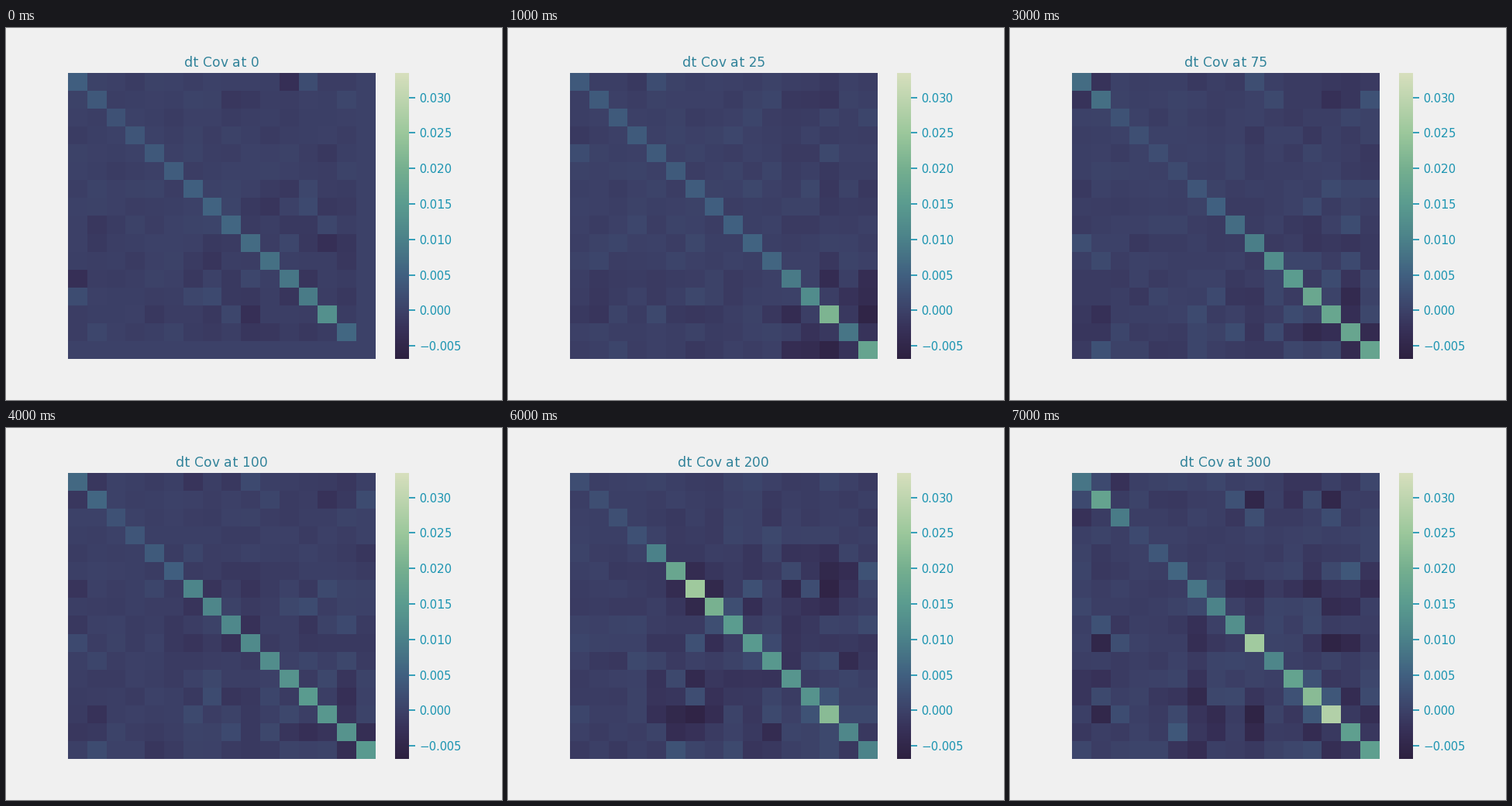
These frames come from a looping animation (640x480 px, 8000 ms). A matplotlib script:

```python
import matplotlib.pyplot as plt
import numpy as np
from matplotlib.animation import FuncAnimation
from matplotlib.colors import LinearSegmentedColormap

SIZE = 16
UNIT = 1e-4
VMIN, VMAX = -0.00686, 0.0335
BACK, TITLE, TICK = "#f0f0f0", "#31839a", "#1b94b1"

STOPS = {
    VMIN: "#2d203f", -0.003: "#362f56", 0: "#3c4168", 0.005: "#406080",
    0.01: "#4b8189", 0.015: "#5a9b8f", 0.02: "#75af8f", 0.025: "#9bc79b",
    VMAX: "#d7dfbd",
}
cmap = LinearSegmentedColormap.from_list(
    "sea", [((v - VMIN) / (VMAX - VMIN), c) for v, c in STOPS.items()])


def covariance(seed, profile, links):
    """Symmetric matrix whose variances follow a few key points.

    The covariances are noise that grows with both variances and leans
    negative; links sets the few pairs that stand out.
    """
    var = np.interp(np.arange(SIZE), list(profile), list(profile.values()))
    noise = np.random.default_rng(seed).normal(-0.06, 0.1, (SIZE, SIZE))
    upper = np.triu(noise * np.sqrt(np.outer(var, var)), 1)
    for pair, value in links.items():
        upper[pair] = value
    return (upper + upper.T + np.diag(var)) * UNIT


cov0 = covariance(
    1, {0: 48, 2: 27, 9: 66, 12: 92, 13: 130, 14: 62, 15: 0},
    {(0, 11): -30, (0, 12): 19, (9, 13): -30})
cov25 = covariance(
    2, {0: 40, 5: 41, 10: 58, 12: 122, 13: 210, 14: 82, 15: 172},
    {(0, 4): 19, (11, 15): -34, (13, 15): -55})
cov75 = covariance(
    3, {0: 68, 1: 72, 2: 28, 5: 16, 8: 68, 12: 180, 15: 172},
    {(1, 13): -29, (1, 15): 26, (8, 14): 19, (14, 15): -40})
cov150 = covariance(
    4, {0: 52, 2: 23, 5: 110, 6: 255, 8: 205, 10: 120, 14: 55, 15: 100},
    {(0, 6): -35, (5, 8): -46, (6, 7): -65, (6, 9): -55})
cov200 = covariance(
    5, {0: 20, 3: 25, 6: 255, 8: 152, 12: 135, 13: 225, 14: 112, 15: 104},
    {(5, 13): -46, (5, 15): 29, (6, 7): -46, (6, 13): -56, (12, 13): 29})
cov300 = covariance(
    6, {0: 82, 1: 170, 3: 14, 8: 126, 9: 258, 10: 111, 13: 282, 14: 160},
    {(1, 8): 27, (1, 13): -48, (5, 14): 37, (9, 13): -58, (12, 13): 37})

scenes = [
    (0, cov0), (25, cov25), (50, (cov25 + cov75) / 2), (75, cov75),
    (100, (2 * cov75 + cov150) / 3), (150, cov150), (200, cov200),
    (300, cov300),
]

# Whole-pixel glyph advances
plt.rcParams.update({"font.family": "DejaVu Sans", "text.hinting_factor": 1})
fig = plt.figure(figsize=(6.4, 4.8), dpi=100, facecolor=BACK)
ax = fig.add_axes([0.125, 0.11, 0.62, 0.77])
cax = fig.add_axes([0.78375, 0.11, 0.028875, 0.77])

mesh = ax.pcolormesh(cov0, cmap=cmap, vmin=VMIN, vmax=VMAX)
ax.invert_yaxis()
ax.axis("off")
title = ax.set_title("", fontsize=12, color=TITLE, pad=5.4)

bar = fig.colorbar(mesh, cax=cax, ticks=np.arange(-1, 7) * 0.005)
bar.outline.set_visible(False)
cax.tick_params(length=6, width=1.25, pad=3.5, labelsize=11,
                color=TICK, labelcolor=TICK)


def draw(index):
    step, cov = scenes[index]
    mesh.set_array(cov)
    title.set_text(f"dt Cov at {step}")
    return mesh, title


anim = FuncAnimation(fig, draw, frames=len(scenes), interval=1000,
                     repeat=True, repeat_delay=0)
plt.show()
```
